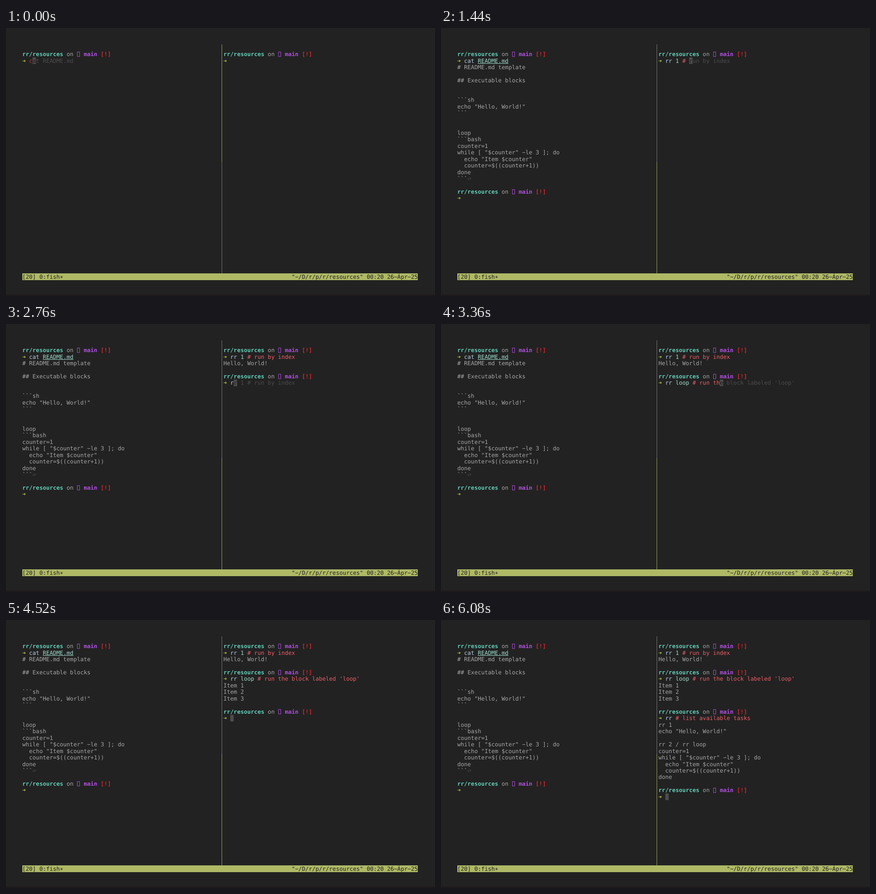
Write an HTML page with a canvas that moves like this. It is 947 px wide and 592 px high and loops after 8360 ms.

```html
<!DOCTYPE html>
<html lang="en">
<head>
<meta charset="utf-8">
<title>Terminal session</title>
<style>
html, body { margin: 0; width: 100%; height: 100%; overflow: hidden; background: #222; }
canvas { display: block; }
</style>
</head>
<body>
<canvas id="stage" width="947" height="592"></canvas>
<script>
const ctx = document.getElementById('stage').getContext('2d');
const LOOP = 8360, STEP = 40;
const LEFT = 36, TOP = 36, CW = 7.526, RH = 14.47, ASCENT = 11.6;
const RIGHT_COL = 59;
const FONT = '12.5px "DejaVu Sans Mono", "Liberation Mono", monospace';
const C = {
  bg: '#222222', text: '#a6a6a6', dir: '#62ccb6', branch: '#b04fdd', flag: '#d8262d',
  arrow: '#b6c840', cmd: '#b4cfe0', arg: '#9fdccb', note: '#ea5f67', bad: '#cf2a2a',
  ghost: '#4b4b4b', cursor: '#4c4c4c', bar: '#afb965', line: '#9ca45a', dimLine: '#767676'
};

const README = `# README.md template

## Executable blocks


\`\`\`sh
echo "Hello, World!"
\`\`\`


loop
\`\`\`bash
counter=1
while [ "$counter" \u2212le 3 ]; do
  echo "Item $counter"
  counter=$((counter+1))
done
\`\`\``;
const TASKS = `rr 1
echo "Hello, World!"

rr 2 / rr loop
counter=1
while [ "$counter" \u2212le 3 ]; do
  echo "Item $counter"
  counter=$((counter+1))
done`;
const BY_INDEX = 'rr 1 # run by index';
const BY_LABEL = "rr loop # run the block labeled 'loop'";
const LIST = 'rr # list available tasks';

// Each command: typing start, characters per step, enter and output times,
// and the older history entry suggested until the text differs.
const CAT = { text: 'cat README.md', row: 2, col: 0, start: 0, rate: 2, enter: 280, done: 280, out: README, next: 22 };
const RUNS = [
  { text: BY_INDEX, row: 2, start: 1320, rate: 2, enter: 1880, done: 1920, out: 'Hello, World!', next: 5, old: LIST, title: true },
  { text: BY_LABEL, row: 6, start: 2760, rate: 1, enter: 4480, done: 4520, out: 'Item 1\nItem 2\nItem 3', next: 11, old: BY_INDEX },
  { text: LIST, row: 12, start: 5320, rate: 2, enter: 6040, done: 6080, out: TASKS, next: 23, old: BY_LABEL, title: true }
];
const FOCUS = 960;

const px = col => LEFT + col * CW;
const py = row => TOP + row * RH;

function put(text, col, row, color, bold) {
  ctx.font = (bold ? 'bold ' : '') + FONT;
  ctx.fillStyle = color;
  [...text].forEach((ch, i) => {
    if (ch !== ' ') ctx.fillText(ch, px(col + i), py(row) + ASCENT);
  });
}

function lines(text, col, row) {
  text.split('\n').forEach((s, i) => put(s, col, row + i, C.text));
}

function prompt(col, row) {
  put('rr/resources', col, row, C.dir, true);
  put('on', col + 13, row, C.text);
  ctx.strokeStyle = C.branch;
  ctx.lineWidth = 1;
  ctx.strokeRect(px(col + 16) + 1.1, py(row) + 2.5, 5, 10);
  put('main', col + 18, row, C.branch, true);
  put('[!]', col + 23, row, C.flag, true);
  put('\u279c', col, row + 1, C.arrow, true);
}

function cursor(col, row, ch = ' ') {
  ctx.fillStyle = C.cursor;
  ctx.fillRect(px(col), py(row), CW, RH);
  put(ch, col, row, C.bg);
}

// Typed text in the shell's highlighting colours.
function typed(text, col, row) {
  const hash = text.indexOf('#');
  const code = hash < 0 ? text : text.slice(0, hash);
  const gap = code.indexOf(' ');
  const name = gap < 0 ? code : code.slice(0, gap);
  put(name, col, row, name === 'c' ? C.bad : C.cmd);
  if (gap >= 0) {
    const arg = code.slice(gap + 1).trimEnd();
    put(arg, col + gap + 1, row, C.arg);
    if (name === 'cat' && arg) {
      ctx.fillStyle = C.arg;
      ctx.fillRect(px(col + gap + 1), Math.round(py(row) + 12.8), arg.length * CW, 1);
    }
  }
  if (hash >= 0) put(text.slice(hash), col + hash, row, C.note);
}

function command(run, col, t, active) {
  if (t < run.start) {
    if (active) cursor(col + 2, run.row);
    return;
  }
  const count = Math.min(run.text.length, 1 + run.rate * Math.floor((t - run.start) / STEP));
  const text = run.text.slice(0, count);
  typed(text, col + 2, run.row);
  if (t < run.enter) {
    const guess = run.old && run.old.startsWith(text) ? run.old : run.text;
    put(guess.slice(count + 1), col + 3 + count, run.row, C.ghost);
    cursor(col + 2 + count, run.row, guess[count]);
  } else if (t < run.done) {
    cursor(col, run.row + 1);
  } else {
    lines(run.out, col, run.row + 1);
    prompt(col, run.next);
  }
}

function frame(t) {
  const right = t >= FOCUS;
  ctx.fillStyle = C.bg;
  ctx.fillRect(0, 0, 947, 592);
  ctx.fillStyle = '#1d1a1c';
  ctx.fillRect(0, 589, 947, 3);

  ctx.fillStyle = right ? C.dimLine : C.line;
  ctx.fillRect(476, 36, 1, 260);
  ctx.fillStyle = right ? C.line : C.dimLine;
  ctx.fillRect(476, 296, 1, 246);

  prompt(0, 1);
  command(CAT, 0, t, !right);
  if (t >= CAT.done) {
    put('\u23ce', 3, 20, '#5c5c5c');
    if (!right) cursor(2, 23);
  }

  prompt(RIGHT_COL, 1);
  let ready = right;
  for (const run of RUNS) {
    command(run, RIGHT_COL, t, ready);
    ready = ready && t >= run.done;
  }
  if (ready) cursor(RIGHT_COL + 2, 24);

  ctx.fillStyle = C.bar;
  ctx.fillRect(36, 542, 873, 15);
  put('[20] 0:fish\u2217', 0, 35, C.bg);
  const busy = RUNS.some(r => r.title && t >= r.enter && t < r.done);
  const title = busy ? 'rr ~/D/r/p/r/resource' : '~/D/r/p/r/resources';
  const status = `"${title}" 00:20 26\u2212\u00c1pr\u221225`;
  put(status, 116 - status.length, 35, C.bg);
}

ctx.textBaseline = 'alphabetic';
ctx.textRendering = 'geometricPrecision';
const began = performance.now();
function tick() {
  frame((performance.now() - began) % LOOP);
  requestAnimationFrame(tick);
}
tick();
</script>
</body>
</html>
```
